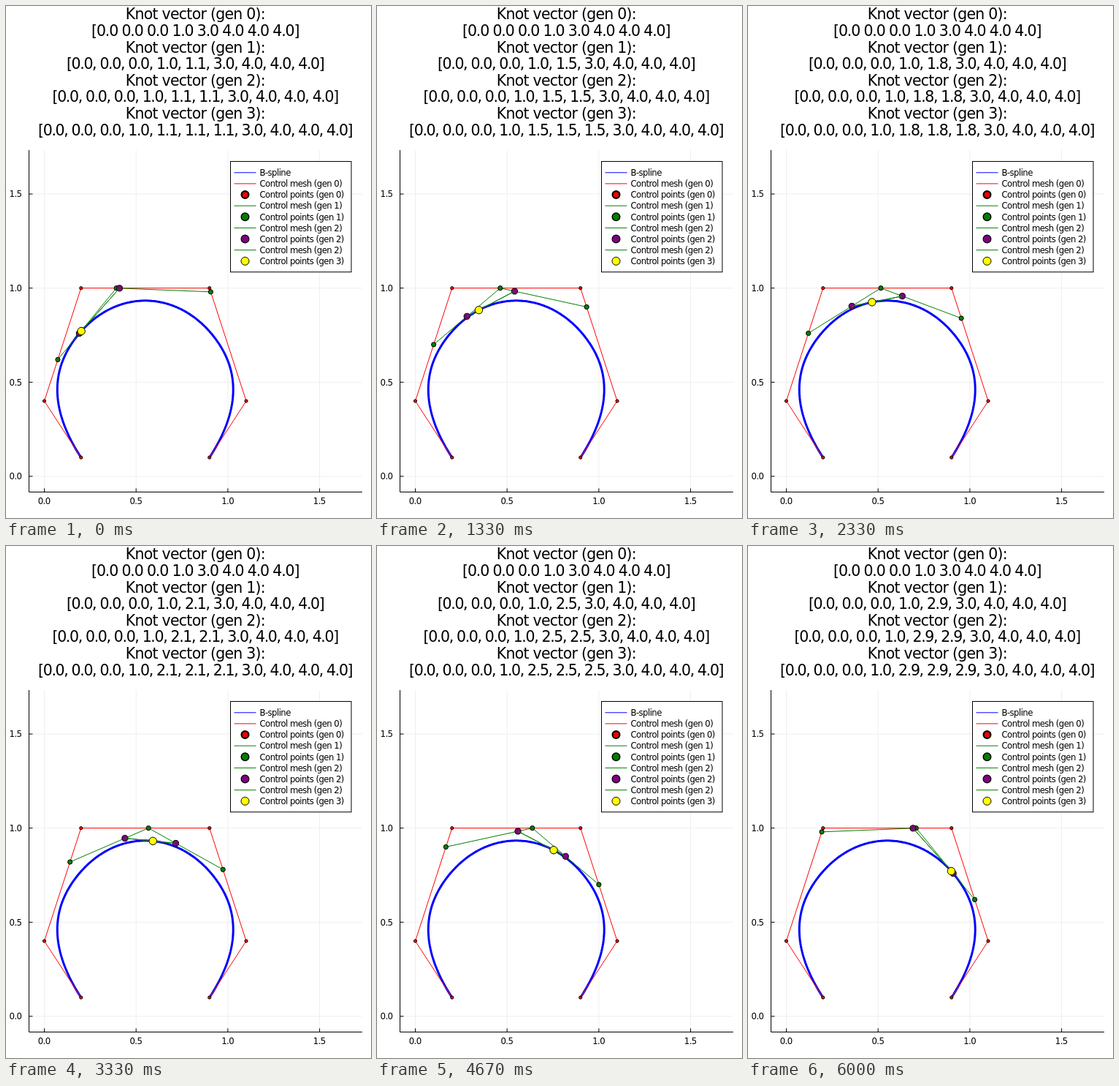
Animation, 500 px wide and 700 px high, one loop 6.33 s. Source, as an HTML page:

```html
<!DOCTYPE html>
<html lang="en">
<head>
<meta charset="utf-8">
<title>B-spline knot insertion</title>
<style>
  html, body { margin: 0; width: 100%; height: 100%; overflow: hidden; background: #fff; }
  svg { display: block; width: 500px; height: 700px; }
  text { font: 11.7px "DejaVu Sans", sans-serif; letter-spacing: -.57px; white-space: pre; }
  .head text { font-size: 20.5px; letter-spacing: -.75px; text-anchor: middle; }
  .head .plain { letter-spacing: -1.16px; }
  .head .list { letter-spacing: -1.36px; }
  .mid { text-anchor: middle; }
  .end { text-anchor: end; }
</style>
</head>
<body>
<svg viewBox="0 0 500 700"><g id="fixed"></g><g id="moving"></g><g id="legend"></g><g id="head" class="head"></g></svg>
<script>
const KNOTS = [0, 0, 0, 1, 3, 4, 4, 4];
const POINTS = [[.2, .1], [0, .4], [.2, 1], [.9, 1], [1.1, .4], [.9, .1]];
const LOOP = 6330, STEPS = 19;
const LEFT = 31.5, RIGHT = 488, TOP = 197, BOTTOM = 664.5;
const $ = id => document.getElementById(id);
const px = x => 52.5 + 251.4 * x;
const py = y => 643 - 257.3 * y;

const line = (pts, color, width = 1) =>
  `<polyline points="${pts.map(p => p.map(v => v.toFixed(2))).join(' ')}" fill="none" stroke="${color}" stroke-width="${width}"/>`;
const dot = ([x, y], r, color, width = 1) =>
  `<circle cx="${x}" cy="${y}" r="${r}" fill="${color}" stroke="#000" stroke-width="${width}"/>`;
const label = (x, y, text, cls = '') => `<text x="${x}" y="${y}" class="${cls}">${text}</text>`;
const toPx = pts => pts.map(([x, y]) => [px(x), py(y)]);
const mesh = (pts, color, width) => line(toPx(pts), color, width);
const dots = (pts, r, color) => toPx(pts).map(p => dot(p, r, color)).join('');
const lerp = (a, b, s) => a.map((v, i) => v + (b[i] - v) * s);

// De Boor levels 1..3 for parameter t
function deBoor(t) {
  const i = t < 1 ? 2 : t < 3 ? 3 : 4;
  let row = POINTS.slice(i - 2, i + 2);
  const levels = [];
  for (let r = 1; r <= 3; r++) {
    row = row.slice(1).map((p, j) => {
      const a = i - 3 + r + j, lo = KNOTS[a];
      return lerp(row[j], p, (t - lo) / (KNOTS[a + 4 - r] - lo));
    });
    levels.push(row);
  }
  return levels;
}

function drawFixed() {
  let grid = '', axes = line([[LEFT, TOP], [LEFT, BOTTOM], [RIGHT, BOTTOM]], '#000');
  for (const v of [0, .5, 1, 1.5]) {
    const x = px(v), y = py(v), text = v.toFixed(1);
    grid += line([[x, TOP], [x, BOTTOM]], '#eee') + line([[LEFT, y], [RIGHT, y]], '#eee');
    axes += line([[x, BOTTOM], [x, BOTTOM - 5]], '#000') + line([[LEFT, y], [LEFT + 5, y]], '#000');
    axes += label(x - .3, 680.5, text, 'mid') + label(21.5, y + 4.3, text, 'end');
  }
  const curve = Array.from({ length: 201 }, (_, i) => deBoor(i / 50)[2][0]);
  $('fixed').innerHTML = grid + axes + mesh(curve, '#00f', 3) +
    mesh(POINTS, 'red') + dots(POINTS, 2.1, 'red');
}

function drawLegend() {
  const rows = [['B-spline', '#00f'],
    ['Control mesh (gen 0)', 'red'], ['Control points (gen 0)', 'red', 2.2],
    ['Control mesh (gen 1)', 'green'], ['Control points (gen 1)', 'green', 1.5],
    ['Control mesh (gen 2)', 'green'], ['Control points (gen 2)', 'purple', 1.2],
    ['Control mesh (gen 2)', 'green'], ['Control points (gen 3)', 'yellow', 1]];
  $('legend').innerHTML =
    '<rect x="307.5" y="212.5" width="165.5" height="151.2" fill="#fff" stroke="#000"/>' +
    rows.map(([text, color, width], i) => {
      const y = 227.8 + 15.12 * i;
      const key = width ? dot([327.5, y], 6 - width / 2, color, width) : line([[312.5, y], [342.5, y]], color);
      return key + label(347.5, y + 4.3, text);
    }).join('');
}

function draw(t) {
  const [one, two, three] = deBoor(t);
  $('moving').innerHTML =
    mesh(one, 'green') + dots(one, 3.1, 'green') +
    mesh(two, 'green') + dots(two, 4.1, 'purple') +
    mesh([two[0], three[0], two[1]], 'green') + dots(three, 5.2, 'yellow');

  let head = '';
  for (let g = 0; g < 4; g++) {
    const knots = [...KNOTS.slice(0, 4), ...Array(g).fill(t), ...KNOTS.slice(4)];
    const list = knots.map(k => k.toFixed(1)).join(g ? ', ' : ' ');
    const y = 18.2 + 45.3 * g;
    head += label(259.4, y, `Knot vector (gen ${g}):`) +
      label(259.2, y + 22.65, `[${list}]`, g ? 'list' : 'plain');
  }
  $('head').innerHTML = head;
}

let shown = -1;
function tick() {
  const ms = performance.now() % LOOP;
  let n = 0;
  while (n < STEPS - 1 && ms >= 10 * Math.round((n + 1) * 100 / 3)) n++;
  if (n !== shown) draw(1.1 + n / 10);
  shown = n;
  requestAnimationFrame(tick);
}

drawFixed();
drawLegend();
tick();
</script>
</body>
</html>
```
